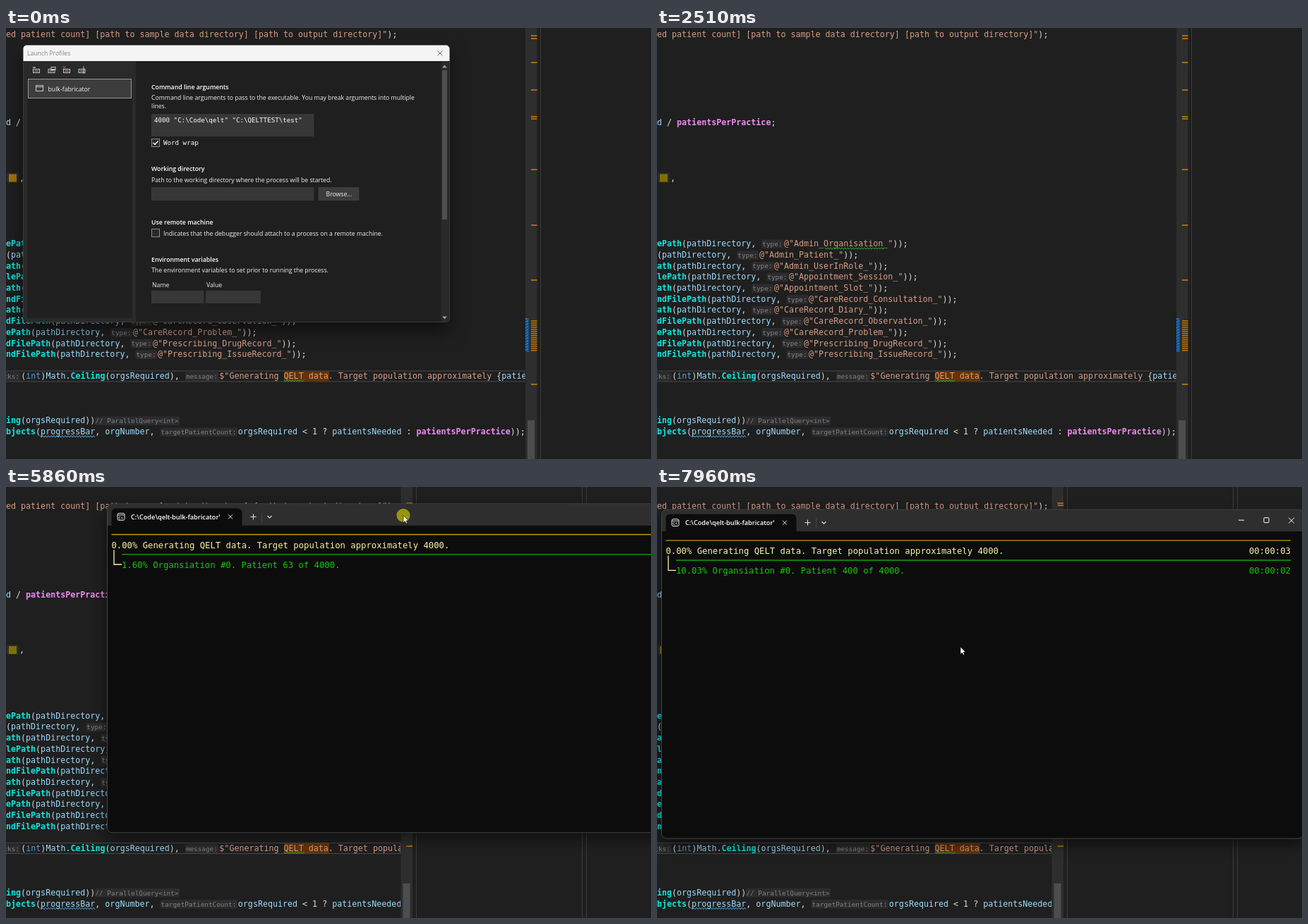
An HTML page with a canvas that plays this animation: 914 by 612 pixels, repeating every 8000 ms.

```html
<!DOCTYPE html>
<html lang="en">
<head>
<meta charset="utf-8">
<style>
html, body { margin: 0; width: 914px; height: 612px; overflow: hidden; background: #1f1f1f; }
canvas { display: block; }
</style>
</head>
<body>
<canvas id="stage" width="914" height="612"></canvas>
<script>
const g = document.getElementById('stage').getContext('2d');
const LOOP = 8000;
const MONO = '"DejaVu Sans Mono", "Noto Sans Mono", monospace';
const SANS = '"Open Sans", "Noto Sans", sans-serif';
const COLORS = { m: '#12e6e0', v: '#9cdcfe', s: '#d69d85', w: '#dcdcdc', k: '#569cd6', p: '#ee8af2', h: '#828282' };

// Screen updates come in bursts: start, end, interval.
const BURSTS = [[1220, 1960, 74], [2030, 2510, 70], [5610, 6400, 62.5], [6490, 7230, 62.5], [7300, 7960, 66]];

function snap(t) {
  const burst = BURSTS.findLast(([start]) => start <= t);
  if (!burst) return t;
  const [start, end, step] = burst;
  return t >= end ? end : start + Math.floor((t - start) / step) * step;
}

// Linear path through [time, ...values] points.
function along(points, t) {
  if (t <= points[0][0]) return points[0].slice(1);
  for (let i = 1; i < points.length; i++) {
    const [a, b] = [points[i - 1], points[i]];
    if (t < b[0]) {
      const f = (t - a[0]) / (b[0] - a[0]);
      return a.slice(1).map((v, j) => v + (b[j + 1] - v) * f);
    }
  }
  return points.at(-1).slice(1);
}

function box(x, y, w, h, fill, stroke) {
  if (fill) { g.fillStyle = fill; g.fillRect(x, y, w, h); }
  if (stroke) { g.strokeStyle = stroke; g.lineWidth = 1; g.strokeRect(x + .5, y + .5, w - 1, h - 1); }
}

function round(x, y, w, h, r, fill, stroke) {
  g.beginPath();
  g.roundRect(x, y, w, h, r);
  if (fill) { g.fillStyle = fill; g.fill(); }
  if (stroke) { g.strokeStyle = stroke; g.lineWidth = 1; g.stroke(); }
}

function path(color, width, ...pts) {
  g.beginPath();
  pts.forEach(([x, y]) => g.lineTo(x, y));
  g.strokeStyle = color;
  g.lineWidth = width;
  g.stroke();
}

function cross(x, y, r, color) {
  path(color, 1, [x - r, y - r], [x + r, y + r]);
  path(color, 1, [x - r, y + r], [x + r, y - r]);
}

function text(str, x, y, font, color) {
  g.font = font;
  g.fillStyle = color;
  g.fillText(str, x, y);
  return g.measureText(str).width;
}

const ui = (str, x, y, color = '#f0f0f0', weight = 400, size = 8.7) =>
  text(str, x, y, `${weight} ${size}px ${SANS}`, color);

function shadowed(blur, dy, draw) {
  g.save();
  g.shadowColor = 'rgba(0,0,0,.55)';
  g.shadowBlur = blur;
  g.shadowOffsetY = dy;
  draw();
  g.restore();
}

function wave(x0, x1, y, color) {
  const pts = [];
  for (let x = x0, i = 0; x <= x1; x += 2, i++) pts.push([x, y + (i % 2 ? 1.2 : -1.2)]);
  path(color, 1, ...pts);
}

// Each segment starts with the key of its colour; y is the middle of the line.
function code(x, y, ...segs) {
  for (const seg of segs) {
    const key = seg[0], str = seg.slice(1);
    if (key === 'h') {
      const w = str.length * 5.62;
      round(x + 1, y - 5.5, w + 2.5, 12.5, 2, '#2c2c2e');
      text(str, x + 2, y + 4, '9.33px ' + MONO, COLORS.h);
      x += w + 4.5;
    } else {
      const weight = 'mp'.includes(key) ? 700 : 400;
      x += text(str, x, y + 4.2, `${weight} 11.67px ${MONO}`, COLORS[key]);
    }
  }
}

const FILES = [
  ['ePath', 'Admin_Organisation_'], ['', 'Admin_Patient_'], ['ath', 'Admin_UserInRole_'],
  ['lePath', 'Appointment_Session_'], ['ath', 'Appointment_Slot_'], ['ndFilePath', 'CareRecord_Consultation_'],
  ['ath', 'CareRecord_Diary_'], ['dFilePath', 'CareRecord_Observation_'], ['ePath', 'CareRecord_Problem_'],
  ['dFilePath', 'Prescribing_DrugRecord_'], ['ndFilePath', 'Prescribing_IssueRecord_']
];

function codeArea(width, dy, bulb) {
  g.save();
  g.beginPath();
  g.rect(0, 0, width, 612);
  g.clip();
  g.translate(0, dy);
  code(0, 27, 'sed patient count] [path to sample data directory] [path to output directory]"', 'w);');
  code(0, 152.7, 'vd', 'w / ', 'ppatientsPerPractice', 'w;');
  round(1, 224, 17, 14, 2, '#2c2c2e');
  box(4, 226, 11, 11, bulb);
  code(19, 231, 'w,');
  FILES.forEach(([method, file], i) =>
    code(0, 324.5 + i * 15.7, 'm' + method, 'w(', 'vpathDirectory', 'w, ', 'htype:', `s@"${file}"`, 'w));'));
  wave(238, 323, 331.5, '#1fae2f');

  box(-2, 505, width + 2, 16, null, '#4a4a4a');
  box(394, 506, 64, 14, '#653306');
  code(-5.5, 512.7, 'hcks:');
  code(21.3, 512.7, 'w(', 'kint', 'w)', 'vMath', 'w.', 'mCeiling', 'w(', 'vorgsRequired', 'w), ', 'hmessage:',
    's$"Generating QELT data. Target population approximately ', 'w{', 'vpatientsNeeded');
  wave(394, 423, 519.5, '#1fae2f');

  code(0, 575.5, 'ming', 'w(', 'vorgsRequired', 'w))');
  code(124.5, 575.5, 'h// ParallelQuery<int>');
  code(0, 591.5, 'mbjects', 'w(', 'vprogressBar', 'w, ', 'vorgNumber', 'w, ', 'htargetPatientCount:',
    'vorgsRequired', 'w < 1 ? ', 'vpatientsNeeded', 'w : ', 'ppatientsPerPractice', 'w));');
  wave(48, 126, 598.5, '#5ba8e0');
  g.restore();
}

function scrollStrip(x, narrow) {
  const map = y => narrow ? y * .985 + 12.1 : y;
  box(x, 0, 16.5, 612, '#2e2e2e');
  box(x + 3, narrow ? 563 : 557, 10, 60, '#4d4d4d');
  for (const y of [11, 14.5, 49, 88, 125.5, 128.5, 201, 279.5, 357.5, 505.5])
    box(x + 8, Math.round(map(y)) - 1, 8.5, 2, '#a96c10');
  for (let i = 0; i < 15; i++) box(x + 8, map(415) + i * 3, 8.5, 1.8, '#a96c10');
  const top = Math.round(map(412));
  box(x, top, 4.5, 48, '#1b6fc0');
  for (let y = top + 2; y < top + 48; y += 4) path('#123a63', 1, [x, y + 2], [x + 4.5, y - 1]);
}

function editor(t) {
  const narrow = t >= 4030;
  const x = narrow ? 559.5 : 736;
  box(0, 0, 914, 612, '#1f1f1f');
  codeArea(x - .5, narrow ? 0 : -18.5, t < 2030 ? '#a1740d' : '#807000');
  scrollStrip(x, narrow);
  const lines = narrow ? [581, 816, 822] : [757];
  for (const lx of lines) box(lx, 0, 1, 612, '#3b3b3b');
  if (t >= 4190) box(822, 423, 92, 2, '#000');
}

function toolIcon(x, i) {
  const y = 59;
  box(x - 5, y - 1, 10, 6, null, '#c8c8c8');
  path('#c8c8c8', 1, [x - 3, y + 2], [x + 3, y + 2]);
  if (i === 0) path('#d8b46a', 1.5, [x - 5, y - 3], [x - 1, y - 3]);
  if (i === 1) box(x - 1, y - 4, 7, 5, null, '#c8c8c8');
  if (i === 2) cross(x - 3.5, y - 3, 1.8, '#d0604a');
  if (i === 3) path('#c8c8c8', 1, [x + 2.5, y - 4.5], [x + 2.5, y + 6]);
}

function checkbox(y, on) {
  box(206, y, 12, 12, '#2a2a2a', '#8a8a8a');
  if (on) path('#fff', 1.5, [208.5, y + 6], [211, y + 8.5], [215.5, y + 3.5]);
}

function arrow(x, y, d) {
  g.beginPath();
  g.moveTo(x - 3.5, y - 2 * d);
  g.lineTo(x + 3.5, y - 2 * d);
  g.lineTo(x, y + 2 * d);
  g.fillStyle = '#999';
  g.fill();
}

function dialog(t) {
  const [fade] = along([[2240, 1], [2490, 0]], t);
  if (fade <= 0) return;
  const active = t >= 2030, hover = t >= 1880;
  const heading = (str, y) => ui(str, 206, y, '#fff', 600, 8.75);
  const input = (str, x, y) => text(str, x, y, '9.18px ' + MONO, '#fff');
  g.save();
  g.globalAlpha = fade;
  const scale = .93 + .07 * fade;
  g.translate(327, 221);
  g.scale(scale, scale);
  g.translate(-327, -221);
  shadowed(26, 12, () => round(24.5, 24.5, 604, 393, 5, '#1f1f1f'));
  round(24.5, 24.5, 604, 393, 5, '#1f1f1f', '#3a3a3a');
  box(25, 47, 159, 370, '#2a2a2a');
  box(30, 71, 149, 341, '#202020');
  round(24.5, 24.5, 604, 22.5, [5, 5, 0, 0], '#f4f4f4');
  ui('Launch Profiles', 30, 39, active ? '#111' : '#858585', 400, 8.6);
  if (hover) round(603, 24.5, 25.5, 22, [0, 5, 0, 0], '#c83a32');
  cross(615, 36, 3.5, hover ? '#fff' : '#777');

  [43, 64.5, 86, 107.5].forEach(toolIcon);
  box(31, 72, 147, 28, '#3d3d3d', '#9a9a9a');
  box(42, 81, 11, 9, null, '#c8c8c8');
  path('#c8c8c8', 1, [42, 83.5], [53, 83.5]);
  ui('bulk-fabricator', 59.5, 89.5);

  heading('Command line arguments', 86.7);
  ui('Command line arguments to pass to the executable. You may break arguments into multiple', 206, 102);
  ui('lines.', 206, 114.2);
  box(206, 122, 230.5, 32, '#373737');
  input('4000 "C:\\Code\\qelt" "C:\\QELTTEST\\test"', 210, 133.5);
  checkbox(157, true);
  input('Word wrap', 223, 166);

  heading('Working directory', 203.4);
  ui('Path to the working directory where the process will be started.', 206, 218.7);
  box(206, 226, 230.5, 19, '#373737');
  box(442.5, 226, 58, 19, '#3d3d3d');
  ui('Browse...', 453.5, 239.2);

  heading('Use remote machine', 279);
  checkbox(285, false);
  ui('Indicates that the debugger should attach to a process on a remote machine.', 223, 295);

  heading('Environment variables', 331.8);
  ui('The environment variables to set prior to running the process.', 206, 347);
  ui('Name', 207, 367.5);
  ui('Value', 284, 367.5);
  box(206, 373, 74.5, 18, '#373737');
  box(283, 373, 78, 18, '#373737');

  box(616.5, 48, 11, 369, '#2a2a2a');
  box(618, 60, 7, 212, '#4f4f4f');
  arrow(621.5, 54.5, -1);
  arrow(621.5, 411.5, 1);
  g.restore();
}

const WINDOW_PATH = [[5610, 592.5, 178], [5680, 430, 118], [5760, 262, 62], [5860, 143, 24.3], [6000, 82, 25],
  [6200, 22, 28], [6400, 0, 30], [6490, 0, 30], [6740, -6.5, 31.5], [6900, -6.5, 32], [7230, 6, 32.6]];
const COUNT_PATH = [[5610, 20], [5860, 63], [6740, 196], [7960, 400]];
const clock = s => '00:00:0' + s;

function terminal(t) {
  if (t < 5610) return;
  if (t < 5670) {
    const fill = g.createLinearGradient(0, 119, 0, 178);
    fill.addColorStop(0, '#3c3c3c');
    fill.addColorStop(1, '#474747');
    round(830, 119, 120, 80, 6, fill);
  }
  const [x, y] = along(WINDOW_PATH, t);
  const count = Math.floor(along(COUNT_PATH, t)[0] + 1e-6);
  const percent = ((count + 1) / 40 + 1e-9).toFixed(2);
  g.save();
  g.translate(x, y);
  shadowed(22, 8, () => round(0, 0, 911, 467, 7, '#0c0c0c'));
  round(0, 0, 911, 30.5, [7, 7, 0, 0], '#2e2e2e');
  round(.5, -.5, 910, 467, 7, null, '#454545');
  round(6.5, 6, 185, 25, [6, 6, 0, 0], '#0c0c0c');

  round(15, 13, 10, 10, 2, null, '#e8e8e8');
  path('#e8e8e8', 1, [15, 15.5], [25, 15.5]);
  text('C:\\', 16.2, 21.5, '700 5px ' + SANS, '#e8e8e8');
  g.save();
  g.beginPath();
  g.rect(33, 8, 127, 20);
  g.clip();
  ui('C:\\Code\\qelt-bulk-fabricator\\bin', 34, 21.5, '#fff', 600, 9.2);
  g.restore();
  cross(175, 18, 3, '#e8e8e8');
  path('#e8e8e8', 1, [203.5, 18], [211.5, 18]);
  path('#e8e8e8', 1, [207.5, 14], [207.5, 22]);
  path('#444', 1, [219.5, 12], [219.5, 25]);
  path('#e8e8e8', 1.2, [227.5, 16.5], [230.5, 19.5], [233.5, 16.5]);
  path('#fff', 1, [818, 14.5], [826, 14.5]);
  round(854, 11, 7, 7, 1, null, '#fff');
  cross(893, 15, 3.8, '#fff');

  const font = '12.24px ' + MONO;
  const pale = '#f9f1a5', green = '#16c60c';
  path('#c19c00', 1.3, [6.5, 43.2], [892, 43.2]);
  text('0.00% Generating QELT data. Target population approximately 4000.', 6.5, 62.2, font, pale);
  text(clock(t < 6600 ? 1 : t < 7600 ? 2 : 3), 833, 62.2, font, pale);
  path('#13a10e', 1.3, [21, 71.4], [892, 71.4]);
  text(`${percent}% Organsiation #0. Patient ${count} of 4000.`, 21, 90.2, font, green);
  text(clock(t < 6490 ? 0 : t < 7490 ? 1 : 2), 833, 90.2, font, green);
  path(pale, 1.3, [10, 65], [10, 85.7], [21, 85.7]);
  g.restore();
}

const CLOSE_PATH = [[1220, 196, 428], [1620, 652, 130], [1960, 609, 33], [2240, 609, 33], [2500, 237, 186]];
const DRAG_PATH = [[5610, 825, 160.5], [5680, 728, 108], [5760, 635, 62], [5860, 563, 40.3], [6000, 505, 41.5],
  [6200, 449, 44.5], [6400, 428, 46.5], [6490, 428, 46.5], [6740, 421, 48], [6900, 421, 48.5], [7230, 433.5, 49],
  [7300, 433.5, 51], [7650, 430, 227]];

function pointer(t) {
  const closing = t >= 1220 && t < 2510;
  if (!closing && t < 5610) return;
  const [x, y] = along(closing ? CLOSE_PATH : DRAG_PATH, t);
  const pressed = closing ? t >= 2030 && t < 2240 : t < 7230;
  if (pressed) {
    g.beginPath();
    g.arc(x, y, 9.5, 0, 7);
    g.fillStyle = closing ? 'rgba(236,172,10,.85)' : 'rgba(200,192,4,.7)';
    g.fill();
  }
  g.beginPath();
  for (const [dx, dy] of [[0, 0], [0, 10.5], [2.4, 8.3], [4, 11.8], [5.7, 11], [4.2, 7.6], [7.3, 7.4]])
    g.lineTo(x + dx, y + dy);
  g.closePath();
  g.fillStyle = '#fff';
  g.fill();
  g.strokeStyle = '#111';
  g.lineWidth = .7;
  g.stroke();
}

const start = performance.now();
function frame() {
  const t = Math.max(0, performance.now() - start) % LOOP;
  const shown = snap(t);
  editor(t);
  dialog(shown);
  terminal(shown);
  pointer(shown);
  requestAnimationFrame(frame);
}
frame();
</script>
</body>
</html>
```
